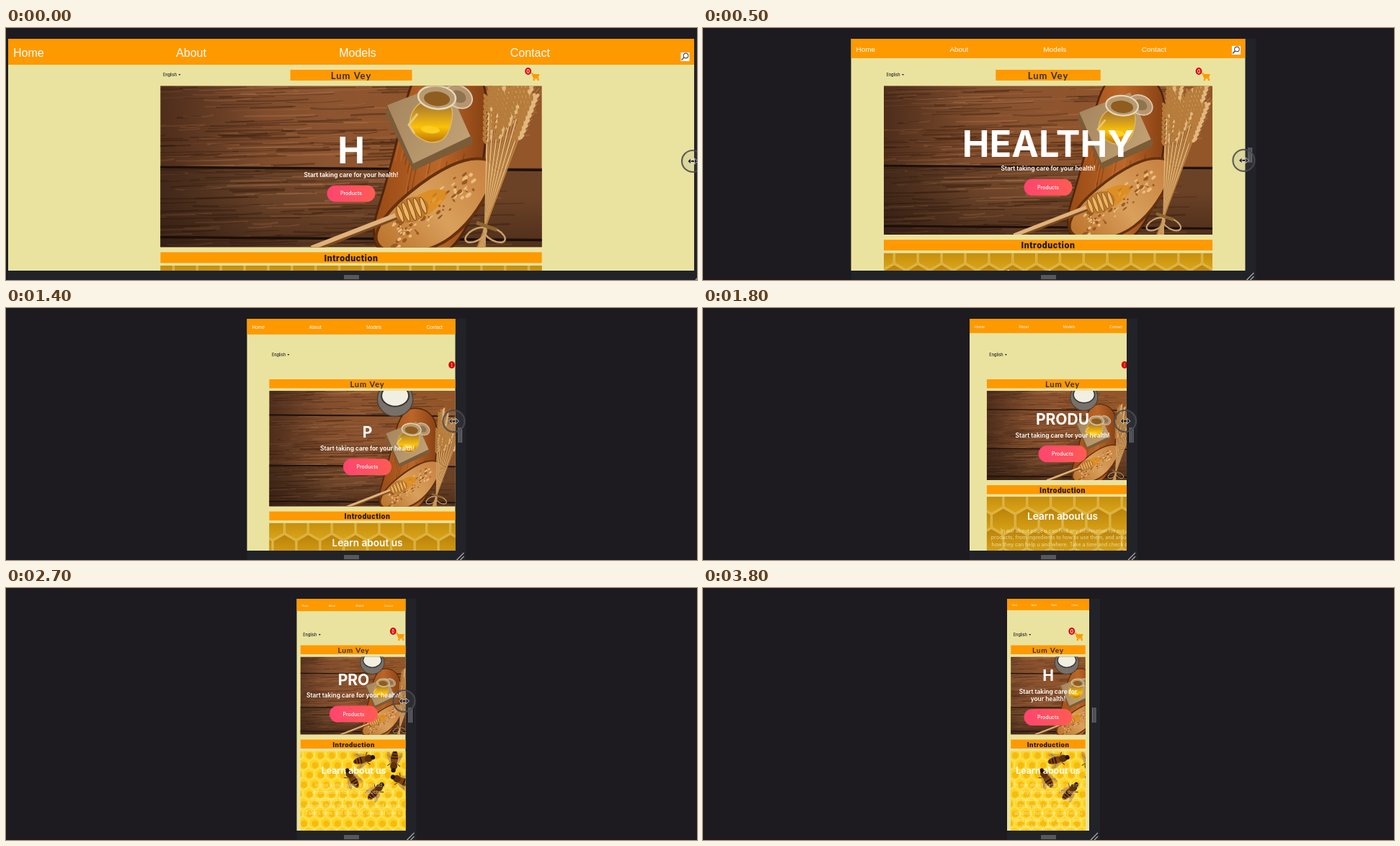
Recreate the animation shown at these times as an HTML page with a canvas. Size 959x350 px, loop 3900 ms.

```html
<!DOCTYPE html>
<html lang="en">
<head>
<meta charset="utf-8">
<title>Responsive resize</title>
<style>
  html, body { margin: 0; width: 100%; height: 100%; overflow: hidden; background: #1d1b20; }
  canvas { display: block; }
</style>
</head>
<body>
<canvas id="stage" width="959" height="350"></canvas>
<script>
const ctx = document.getElementById('stage').getContext('2d');
const LOOP = 3900, STEP = 100, TOP = 15, BOTTOM = 337, CENTER = 479;
const ORANGE = '#ff9900', PAGE = '#eae39f';

// Time, window width and the layout width that trails behind it.
const RESIZE = [[0, 952, 952], [500, 547, 547], [600, 517, 517], [1000, 360, 410],
  [1800, 218, 258], [2700, 151, 158], [3100, 122, 122], [3600, 114, 114]];
const PHRASES = [
  { word: 'HEALTHY', from: -100, until: 1000 },
  { word: 'PRODUCTS', from: 1350, until: 2850 },
  { word: 'HEALTHY', from: 3700, until: 5000 }
];
const TYPE_MS = 90, ERASE_MS = 55;
const ABOUT = 'In our about page u can find any information for our products, from ingredients ' +
  'to how to use them, and around, how they can help u and where. Take a time and check it, u would love it.';

function windowSize(t) {
  const next = RESIZE.findIndex(k => k[0] > t);
  if (next < 0) return RESIZE.at(-1).slice(1);
  const a = RESIZE[next - 1], b = RESIZE[next], p = (t - a[0]) / (b[0] - a[0]);
  return [1, 2].map(i => a[i] + (b[i] - a[i]) * p);
}

function typedText(t) {
  const phrase = PHRASES.find(p => t < p.until);
  const count = Math.min((t - phrase.from) / TYPE_MS, (phrase.until - t) / ERASE_MS);
  return phrase.word.slice(0, Math.max(0, Math.round(count)));
}

// All page measures follow from the layout width.
function pageLayout(left, layout) {
  const wide = layout >= 340, compact = layout < 175, twoLines = layout < 150;
  const width = wide ? 12 + 1.1745 * layout - 0.000663 * layout ** 2 : compact ? layout - 10.5 : layout * 0.815;
  const heroH = wide ? 189 + (width - 382) * 0.237 : compact ? 108 : width * 0.59;
  const heroY = wide ? 80.5 : compact ? 95.5 : 115;
  const buttonY = heroY + heroH / 2 + (wide ? 37.5 : twoLines ? 30 : 25.5);
  const barH = wide ? 15 : 12.5, introY = heroY + heroH + 7;
  return { left, layout, wide, compact, twoLines, width, heroH, heroY, buttonY, barH, introY,
    cx: left + layout / 2, barY: wide ? 58 : heroY - 16, combY: introY + barH + 3.7 };
}

function random(seed) {
  return () => (seed = (seed * 16807) % 2147483647) / 2147483647;
}

function rect(x, y, w, h, fill) {
  ctx.fillStyle = fill;
  ctx.fillRect(x, y, w, h);
}

function ellipse(x, y, rx, ry, angle, fill, stroke, width = 1) {
  ctx.beginPath();
  ctx.ellipse(x, y, rx, ry, angle, 0, Math.PI * 2);
  if (fill) { ctx.fillStyle = fill; ctx.fill(); }
  if (stroke) { ctx.strokeStyle = stroke; ctx.lineWidth = width; ctx.stroke(); }
}

function line(points, stroke, width = 1) {
  ctx.beginPath();
  points.forEach(([x, y]) => ctx.lineTo(x, y));
  ctx.strokeStyle = stroke;
  ctx.lineWidth = width;
  ctx.stroke();
}

// Closed shape; smooth shapes curve through edge midpoints.
function shape(points, fill, smooth, stroke, width = 1) {
  const mid = (a, b) => [(a[0] + b[0]) / 2, (a[1] + b[1]) / 2];
  ctx.beginPath();
  if (smooth) ctx.moveTo(...mid(points.at(-1), points[0]));
  points.forEach((p, i) => smooth
    ? ctx.quadraticCurveTo(...p, ...mid(p, points[(i + 1) % points.length]))
    : ctx.lineTo(...p));
  ctx.closePath();
  ctx.fillStyle = fill;
  ctx.fill();
  if (stroke) { ctx.strokeStyle = stroke; ctx.lineWidth = width; ctx.stroke(); }
}

function gradient(x0, y0, x1, y1, ...colors) {
  const g = ctx.createLinearGradient(x0, y0, x1, y1);
  colors.forEach((c, i) => g.addColorStop(i / (colors.length - 1), c));
  return g;
}

function text(str, x, y, size, { weight = 500, family = 'Inter', color = '#fff', align = 'center', spacing = 0 } = {}) {
  ctx.font = `${weight} ${size}px "${family}", sans-serif`;
  ctx.letterSpacing = spacing + 'px';
  ctx.textAlign = align;
  ctx.fillStyle = color;
  ctx.fillText(str, x, y + size * 0.36);
  ctx.letterSpacing = '0px';
}

function clipped(x, y, w, h, draw) {
  ctx.save();
  ctx.beginPath();
  ctx.rect(x, y, w, h);
  ctx.clip();
  draw();
  ctx.restore();
}

function drawWood() {
  const rnd = random(77);
  rect(-265, -313, 530, 313, gradient(-265, 0, 200, 0, '#6a4027', '#8c5430', '#935629'));
  rect(-265, -110, 530, 110, gradient(-265, 0, 200, 0, '#573823', '#74482b', '#6b4226'));
  for (let i = 0; i < 420; i++) {
    const x = rnd() * 440 - 310, y = -313 * rnd(), length = 25 + rnd() * 110, bend = rnd() * 6 - 3;
    ctx.beginPath();
    ctx.moveTo(x, y);
    ctx.quadraticCurveTo(x + length / 2, y + bend, x + length, y - 2);
    ctx.strokeStyle = rnd() < 0.55 ? 'rgba(45,22,10,.34)' : 'rgba(205,140,88,.26)';
    ctx.lineWidth = 0.6 + rnd() * 2.2;
    ctx.stroke();
  }
  for (const y of [-245, -109, -12]) line([[-265, y - 2], [265, y + 2]], '#1d110b', 3.5);
  rect(-265, -313, 530, 313, gradient(-265, 0, -120, 0, 'rgba(25,10,5,.35)', 'rgba(25,10,5,0)'));
  rect(-265, -70, 530, 70, gradient(0, -70, 0, 0, 'rgba(25,10,5,0)', 'rgba(25,10,5,.35)'));
}

// Ears fan out above the knot of the bundle.
function drawWheat() {
  const rnd = random(5), knot = [186, -28];
  for (let i = 0; i < 14; i++) {
    const angle = 0.02 + i * 0.026, reach = 120 + rnd() * 65;
    ctx.save();
    ctx.translate(...knot);
    ctx.rotate(angle);
    line([[0, 30], [0, -reach]], i % 2 ? '#b9803f' : '#deb277', 2.2);
    for (let k = 0; k < 9; k++) {
      const y = -reach - k * 7.5;
      ellipse(-3, y, 2.4, 5.5, -0.45, '#b67c3b');
      ellipse(3, y - 3, 2.4, 5.5, 0.45, '#e3b87c');
      line([[4, y - 6], [8, y - 17]], 'rgba(226,185,128,.6)', 0.7);
    }
    ctx.restore();
  }
  for (const side of [-1, 1]) ellipse(knot[0] + side * 13, -17, 16, 8, side * 0.5, null, '#caa06a', 2.5);
  line([[174, -34], [202, -24]], '#8f632f', 5);
}

function drawJar() {
  shape([[50, -197], [132, -229], [168, -148], [86, -108]], gradient(50, -200, 168, -130, '#a5865e', '#c4a476'));
  shape([[86, -116], [168, -155], [168, -143], [86, -106], [48, -184], [50, -197]], '#7b5c39');
  ellipse(149, -209, 20, 15, 0.5, 'rgba(190,165,130,.8)', '#d8ccb4', 2);
  ellipse(149, -209, 11, 8, 0.5, '#8f7450');
  shape([[92, -205], [144, -205], [136, -152], [108, -142], [76, -165]],
    gradient(0, -210, 0, -145, '#8d6230', '#c18e25', '#fbc109', '#b87206'), true, '#dfb767', 1.5);
  ellipse(119, -208, 26, 16, 0.1, '#b79a70', '#e6d8bc', 2.5);
  ellipse(119, -206, 18, 10, 0.1, '#8f5d20');
  line([[92, -185], [80, -170], [88, -158]], '#e8c77b', 3);
  ellipse(110, -163, 13, 5, 0.1, '#ffcf20');
}

function drawBread() {
  const rnd = random(21);
  shape([[205, -118], [165, -126], [110, -100], [50, -50], [28, -8], [60, 12], [118, 2], [160, -30], [190, -75]],
    gradient(50, 0, 180, -110, '#bd762f', '#d9a05c', '#c98443'), true, '#65310d', 4);
  for (let i = 0; i < 90; i++) {
    const p = rnd(), x = 58 + p * 112, y = -12 - p * 84 + rnd() * 40 - 20;
    ellipse(x, y, 1 + rnd() * 4, 0.8 + rnd() * 2, -0.7, rnd() < 0.6 ? '#9c5a23' : '#ecbd7d');
  }
  shape([[76, -62], [110, -82], [138, -78], [122, -56], [96, -38]], 'rgba(225,135,10,.65)', true);
  line([[-55, 3], [66, -44]], '#7b4a20', 9);
  line([[-55, 1], [66, -46]], '#e0b279', 6);
  ellipse(84, -52, 24, 17, -0.35, '#bd792d');
  for (let i = -2; i < 3; i++) ellipse(84 + i * 8, -52 - i * 3, 3, 16 - Math.abs(i) * 2, -0.35, '#eeb765', '#85501c', 1);
}

// Still life, 529 units wide, origin at bottom centre.
function drawScene() {
  drawWood();
  shape([[90, -265], [165, -265], [197, -200], [160, 20], [15, 20], [58, -120]],
    gradient(40, 0, 200, 0, '#9b4c16', '#bb6628', '#7e3a10'), true, '#4f250d', 3);
  const rnd = random(9);
  for (let i = 0; i < 40; i++) {
    const x = 70 + rnd() * 95, y = -190 + rnd() * 140;
    line([[x, y], [x - 9, y + 45]], rnd() < 0.5 ? 'rgba(75,28,6,.3)' : 'rgba(225,135,65,.25)', 1.5);
  }
  ellipse(75, -290, 48, 47, 0, '#77716a', '#4c4139', 3);
  ellipse(75, -299, 37, 29, 0, '#f1eee2', '#393735', 4);
  drawJar();
  drawBread();
  drawWheat();
}

function drawBee(x, y, angle) {
  ctx.save();
  ctx.translate(x, y);
  ctx.rotate(angle);
  for (const s of [-1, 1]) {
    line([[-7, s * 9], [0, 0], [8, s * 10]], '#4a2707', 1);
    ellipse(3, s * 6, 10, 3, s * 0.4, 'rgba(190,145,75,.75)');
  }
  ellipse(4, 0, 11, 5, 0, '#7c440c');
  for (let i = 0; i < 3; i++) rect(3 + i * 4, -4.5 + i, 1.8, 9 - i * 2, '#2b1405');
  ellipse(-7, 0, 5.5, 5, 0, '#5b300c');
  ellipse(-13, 0, 3, 3.2, 0, '#231208');
  ctx.restore();
}

function drawComb({ cx, width, combY, compact }) {
  const r = compact ? 9 : 19, dx = r * 1.73, dy = r * 1.5;
  rect(cx - width / 2, combY, width, BOTTOM - combY, compact ? '#e9ad12' : '#b98310');
  for (let row = 0; row * dy < BOTTOM - combY + r; row++) {
    const start = cx - Math.ceil(width / dx / 2) * dx - (row % 2) * dx / 2;
    for (let x = start; x < cx + width / 2 + dx; x += dx) {
      const y = combY + 5 + row * dy;
      const hex = Array.from({ length: 6 }, (_, i) =>
        [x + r * 0.95 * Math.sin(i * Math.PI / 3), y + r * 0.95 * Math.cos(i * Math.PI / 3)]);
      shape(hex, compact ? '#ffd41f' : gradient(x, y - r, x, y + r, '#b98108', '#dba619'), false,
        compact ? '#ffe772' : '#dfb748', compact ? 1 : 1.6);
      if (compact) ellipse(x + 1, y + 1, r * 0.5, r * 0.5, 0, '#f6bb10');
    }
  }
  if (!compact) return;
  for (let i = 0; i < 5; i++) {
    const a = i * 1.257 + 2.9;
    drawBee(cx + 33 + 36 * Math.cos(a), combY + 32 + 24 * Math.sin(a), i * 1.9 + 1);
  }
}

function drawParagraph(cx, y, width) {
  const size = 7, style = { color: 'rgba(255,250,220,.6)' };
  ctx.font = `500 ${size}px "Inter", sans-serif`;
  const rows = [''];
  for (const word of ABOUT.split(' ')) {
    const next = (rows.at(-1) + ' ' + word).trim();
    if (ctx.measureText(next).width > width) rows.push(word);
    else rows[rows.length - 1] = next;
  }
  rows.forEach((row, i) => text(row, cx, y + i * 9.7, size, style));
}

function drawNav({ left, layout }) {
  const size = 16 * (layout / 952) ** 0.86, h = 12 + size * 1.5;
  rect(left, TOP, layout, h, ORANGE);
  ['Home', 'About', 'Models', 'Contact'].forEach((label, i) =>
    text(label, left + 7 + layout * (i * 0.2375 + (i > 2 ? 0.012 : 0)), TOP + h / 2 + 0.8, size,
      { family: 'Liberation Sans', weight: 400, align: 'left' }));
  const x = left + layout - 12.5, y = TOP + h - 11;
  if (layout < 300) return;
  rect(x - 6, y - 6, 12, 12, '#fff');
  ellipse(x + 1, y - 1.5, 3.3, 3.3, 0, null, '#555', 1.2);
  line([[x - 1.5, y + 1], [x - 5, y + 4.5]], '#555', 1.5);
}

function drawCart(x, y, t) {
  line([[x - 12, y - 4], [x - 10, y - 4], [x - 8, y + 3], [x - 1, y + 3]], ORANGE, 1.4);
  shape([[x - 11, y - 3], [x, y - 3], [x - 2, y + 2], [x - 9, y + 2]], ORANGE);
  for (const wheel of [8, 2]) ellipse(x - wheel, y + 5, 1.3, 1.3, 0, ORANGE);
  ellipse(x - 16, y - 7, 4.4, 5, 0, '#d90404');
  ctx.save();
  ctx.translate(x - 16, y - 7);
  ctx.scale(Math.max(0.25, Math.abs(Math.cos(Math.PI * t / 3600))), 1);
  text('0', 0, 0, 7, { weight: 600 });
  ctx.restore();
}

function drawHero({ cx, width, heroY, heroH, buttonY, wide, twoLines }, t) {
  clipped(cx - width / 2, heroY, width, heroH, () => {
    const scale = Math.max(width, heroH * 1.69) / 529;
    ctx.translate(cx, heroY + heroH);
    ctx.scale(scale, scale);
    drawScene();
  });
  text(typedText(t), cx, buttonY - (wide ? 60 : twoLines ? 58 : 48), wide ? 50.5 : 21, { weight: 750 });

  const lines = twoLines ? ['Start taking care for', 'your health!'] : ['Start taking care for your health!'];
  lines.forEach((s, i) => text(s, cx, buttonY - (twoLines ? 35.5 : 26) + i * 9.7, 8.4, { weight: 600 }));

  ctx.beginPath();
  ctx.roundRect(cx - 33.5, buttonY - 11.5, 67, 23, 11.5);
  ctx.fillStyle = gradient(cx - 33, 0, cx + 33, 0, '#ff456f', '#ff5b54');
  ctx.fill();
  text('Products', cx, buttonY, 7);
}

function drawPage(page, t) {
  const { cx, width, wide, compact, barY, barH, introY, combY } = page;
  const x = cx - width / 2, barW = wide ? width * 0.319 : width;
  const textScale = wide ? 1 : compact ? 0.78 : 0.85;

  drawNav(page);
  text('English', x + 3.5, 65, 5.5, { color: '#222', align: 'left' });
  shape([[x + 25, 64], [x + 28, 64], [x + 26.5, 66]], '#222');
  drawCart(x + width - 3, wide || compact ? 67 : 86, t);

  rect(cx - barW / 2, barY, barW, barH, ORANGE);
  text('Lum Vey', cx, barY + barH / 2 + 0.5, 13 * textScale,
    { family: 'Lato', weight: 700, color: '#33302c', spacing: textScale });
  drawHero(page, t);

  rect(x, introY, width, barH, ORANGE);
  text('Introduction', cx, introY + barH / 2 + 0.5, 12.3 * textScale,
    { family: 'Roboto', weight: 900, color: '#1c1a1c', spacing: 0.6 * textScale });
  if (combY >= BOTTOM) return;
  clipped(x, combY, width, BOTTOM - combY, () => {
    drawComb(page);
    text('Learn about us', cx, combY + (wide ? 29 : 27), 16 * textScale, { weight: 600 });
    drawParagraph(cx, combY + 47, width - 8);
  });
}

function drawHandles(right) {
  for (let i = 0; i < 3; i++) {
    line([[469, 344 + i * 2], [490, 344 + i * 2]], '#8c8c8e');
    line([[right + 4.5 + i * 2.2, 166], [right + 4.5 + i * 2.2, 187]], '#8c8c8e');
  }
  for (const size of [10, 5]) line([[right + 12 - size, 350], [right + 12, 350 - size]], '#aaa', 1.3);
}

function drawCursor(x, t) {
  if (t >= 3500) return;
  const y = 157 + 28 / (1 + Math.exp((t - 850) / 110));
  ellipse(x, y, 15, 15, 0, 'rgba(130,130,130,.12)', 'rgba(72,75,76,.85)', 2.2);
  line([[x - 5, y], [x + 5, y]], '#222', 2);
  for (const s of [-1, 1]) {
    shape([[x + s * 7, y], [x + s * 2.5, y - 4], [x + s * 2.5, y + 4]], '#222', false, '#ddd', 0.8);
  }
}

function draw(t) {
  const [width, layout] = windowSize(t);
  const left = CENTER - width / 2, right = left + width;
  rect(0, 0, 959, 350, '#1d1b20');
  rect(left, TOP, width + 15, 350 - TOP, '#212329');
  rect(left, TOP, width, BOTTOM - TOP, PAGE);
  clipped(left, TOP, width, BOTTOM - TOP, () => drawPage(pageLayout(left, layout), t));
  drawHandles(right);
  drawCursor(right - 2, t);
}

let shown = -1;
function tick() {
  const t = Math.floor(performance.now() % LOOP / STEP) * STEP;
  if (t !== shown) draw(shown = t);
  requestAnimationFrame(tick);
}
tick();
</script>
</body>
</html>
```
